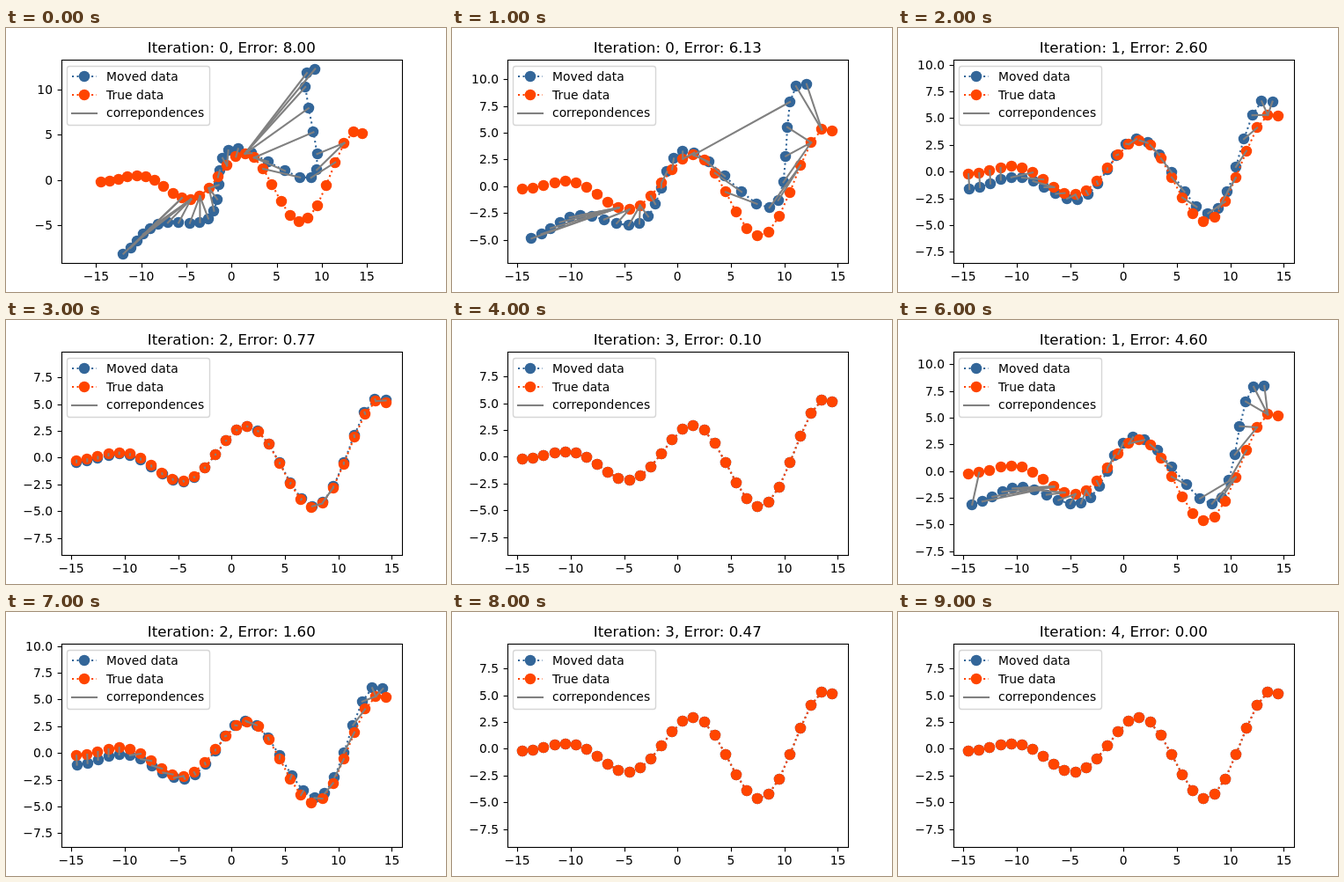
Recreate the animation shown at these times as an HTML page with a canvas. Size 500 by 300 pixels, loop 10000 ms.

```html
<!DOCTYPE html>
<html lang="en">
<head>
<meta charset="utf-8">
<title>Iterative closest point</title>
<style>
  html, body { margin: 0; width: 100%; height: 100%; overflow: hidden; background: #fff; }
  canvas { display: block; }
</style>
</head>
<body>
<canvas id="stage" width="500" height="300"></canvas>
<script>
const ctx = document.getElementById('stage').getContext('2d');
const BOX = { left: 62.5, right: 450, top: 36, bottom: 267 };
const BLUE = '#336699', RED = '#ff4500', GRAY = '#808080';
const LINE = 2.08, DOTS = [2.08, 3.44];
const FRAME_MS = 1000;

// Damped-in sine wave, centred on the origin.
const wave = Array.from({ length: 30 }, (_, i) => 0.2 * i * Math.sin(0.5 * i));
const meanY = wave.reduce((a, b) => a + b) / wave.length;
const truth = wave.map((y, i) => [i - 14.5, y - meanY]);

const distance = (p, q) => Math.hypot(p[0] - q[0], p[1] - q[1]);

function rotate(points, angle) {
  const c = Math.cos(angle), s = Math.sin(angle);
  return points.map(([x, y]) => [x * c - y * s, x * s + y * c]);
}

function nearest(p) {
  let best = 0;
  truth.forEach((q, i) => { if (distance(p, q) < distance(p, truth[best])) best = i; });
  return best;
}

// Each step shows the aligned pose with the matches and the error that led to it.
function alignment(degrees) {
  let angle = degrees * Math.PI / 180;
  return Array.from({ length: 5 }, (_, iteration) => {
    const before = rotate(truth, angle);
    const matches = before.map(nearest);
    const error = before.reduce((sum, p, i) => sum + distance(p, truth[i]), 0) / truth.length;
    let cross = 0, dot = 0;
    before.forEach(([x, y], i) => {
      const [u, v] = truth[matches[i]];
      cross += x * v - y * u;
      dot += x * u + y * v;
    });
    angle += Math.atan2(cross, dot);
    return { iteration, error, matches, moved: rotate(truth, angle) };
  });
}

const wide = alignment(60), narrow = alignment(45);
const steps = [wide[0], ...narrow, ...wide.slice(1)];

// Equal-aspect view with a 5% margin around the data.
function fitView(points) {
  const range = k => {
    const values = points.map(p => p[k]);
    return [Math.min(...values), Math.max(...values)];
  };
  const [x0, x1] = range(0), [y0, y1] = range(1);
  const width = BOX.right - BOX.left, height = BOX.bottom - BOX.top;
  const scale = Math.min(width / (x1 - x0), height / (y1 - y0)) / 1.1;
  const midX = (x0 + x1) / 2, midY = (y0 + y1) / 2;
  return {
    halfX: width / 2 / scale, halfY: height / 2 / scale, midX, midY,
    x: v => (BOX.left + BOX.right) / 2 + (v - midX) * scale,
    y: v => (BOX.top + BOX.bottom) / 2 - (v - midY) * scale
  };
}

function stroke(points, color, width, dash = [], cap = 'butt') {
  ctx.beginPath();
  points.forEach(([x, y]) => ctx.lineTo(x, y));
  ctx.strokeStyle = color;
  ctx.lineWidth = width;
  ctx.lineCap = cap;
  ctx.lineJoin = 'round';
  ctx.setLineDash(dash);
  ctx.stroke();
}

function series(points, color, markers = points) {
  stroke(points, color, LINE, DOTS);
  ctx.fillStyle = color;
  for (const [x, y] of markers) {
    ctx.beginPath();
    ctx.arc(Math.round(x), Math.round(y), 6.25, 0, 2 * Math.PI);
    ctx.fill();
  }
}

function text(value, x, y, align, size = 13.89) {
  ctx.font = `${size}px "DejaVu Sans", sans-serif`;
  ctx.textAlign = align;
  ctx.fillStyle = '#000';
  ctx.fillText(value, x, y);
}

function eachTick(mid, half, step, draw) {
  for (let k = Math.ceil((mid - half) / step); k * step <= mid + half; k++) draw(k * step);
}

function label(value, digits) {
  return (value < 0 ? '\u2212' : '') + Math.abs(value).toFixed(digits);
}

function drawAxes(view) {
  ctx.setLineDash([]);
  ctx.strokeStyle = '#000';
  ctx.lineWidth = 1.11;
  ctx.lineJoin = 'miter';
  ctx.strokeRect(63.5, 36.5, 387, 231);

  eachTick(view.midX, view.halfX, 5, v => {
    const x = Math.round(view.x(v)) + 0.5;
    stroke([[x, 267.5], [x, 272.4]], '#000', 1.11);
    text(label(v, 0), view.x(v), 287, 'center');
  });
  const step = view.halfY > 10 ? 5 : 2.5;
  eachTick(view.midY, view.halfY, step, v => {
    const y = Math.round(view.y(v)) + 0.5;
    stroke([[58.6, y], [63.5, y]], '#000', 1.11);
    text(label(v, step === 5 ? 0 : 1), 53, Math.round(view.y(v) + 5), 'right');
  });
}

function drawLegend() {
  ctx.beginPath();
  ctx.roundRect(69.5, 43.5, 162, 67, 2.8);
  ctx.fillStyle = 'rgba(255,255,255,0.8)';
  ctx.fill();
  ctx.setLineDash([]);
  ctx.strokeStyle = 'rgba(204,204,204,0.8)';
  ctx.lineWidth = 1.39;
  ctx.stroke();

  const handle = y => [[75, y], [103, y]];
  series(handle(55), BLUE, [[89, 55]]);
  series(handle(76), RED, [[89, 76]]);
  stroke(handle(97), GRAY, LINE, [], 'square');
  text('Moved data', 114, 60, 'left');
  text('True data', 114, 81, 'left');
  text('correpondences', 114, 101, 'left');
}

function drawStep({ iteration, error, matches, moved }) {
  const view = fitView([...truth, ...moved]);
  const toPixels = points => points.map(([x, y]) => [view.x(x), view.y(y)]);
  const truePixels = toPixels(truth), movedPixels = toPixels(moved);

  ctx.fillStyle = '#fff';
  ctx.fillRect(0, 0, 500, 300);
  series(movedPixels, BLUE);
  series(truePixels, RED);
  movedPixels.forEach((p, i) => {
    const q = truePixels[matches[i]];
    if (distance(p, q) > 0.1) stroke([p, q], GRAY, LINE, [], 'square');
  });
  drawAxes(view);
  drawLegend();
  text(`Iteration: ${iteration}, Error: ${error.toFixed(2)}`, 256.25, 28, 'center', 16.67);
}

function tick() {
  drawStep(steps[Math.floor(performance.now() / FRAME_MS) % steps.length]);
  requestAnimationFrame(tick);
}
tick();
</script>
</body>
</html>
```
